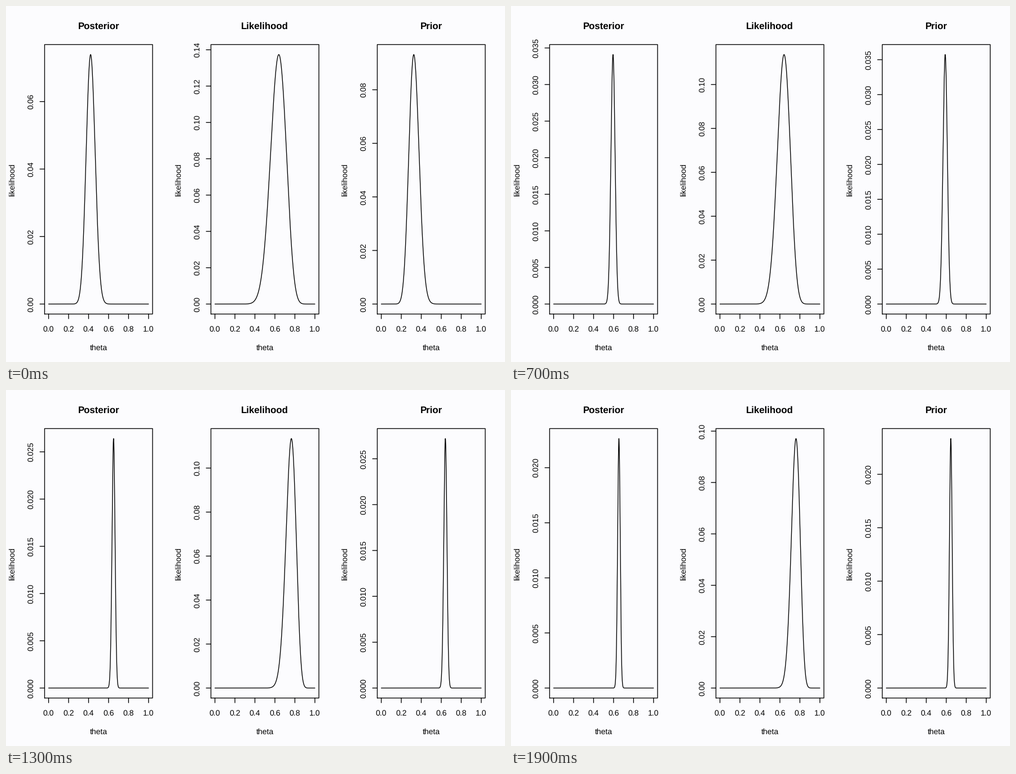
Animation, 885 px wide and 632 px high, one loop 2000 ms. Source, as a matplotlib script:

```python
import math
import numpy as np
import matplotlib as mpl
import matplotlib.pyplot as plt
from matplotlib.animation import FuncAnimation

W, H, DPI = 885, 632, 100
PT = 72 / DPI
INK, PAPER = "black", "#fcfcfe"

mpl.rcParams["font.family"] = "Liberation Sans"
mpl.rcParams["text.hinting"] = "none"

# (trials, successes): the starting prior, then one experiment per step
START = (83, 27)
TRIALS = [(36, 23), (53, 32), (78, 52), (58, 37), (42, 27),
          (94, 60), (70, 45), (53, 34), (66, 46), (81, 57),
          (73, 51), (90, 63), (57, 45), (68, 52), (57, 38),
          (74, 48), (32, 19), (28, 17), (83, 51), (92, 70)]
TOTALS = np.cumsum([START] + TRIALS, axis=0)

LINE = 16.7                      # margin line height in pixels
PANEL = W / 3
LEFT, RIGHT = 4.1 * LINE, PANEL - 2.1 * LINE
TOP, BOTTOM = 4.1 * LINE, H - 5.1 * LINE
PAD_X = (RIGHT - LEFT) * 0.04 / 1.08
PAD_Y = (BOTTOM - TOP) * 0.04 / 1.08
BASE, PEAK = BOTTOM - PAD_Y, TOP + PAD_Y
TICK = LINE / 2
MAX_TICKS = 10

theta = np.linspace(0, 1, 1001)
safe = np.clip(theta, 1e-12, 1 - 1e-12)


def binomial(n, k):
    n, k = int(n), int(k)
    log_c = math.lgamma(n + 1) - math.lgamma(k + 1) - math.lgamma(n - k + 1)
    return np.exp(log_c + k * np.log(safe) + (n - k) * np.log(1 - safe))


def tick_unit(span):
    """Round tick distance for about five intervals."""
    cell = span / 5
    base = 10 ** math.floor(math.log10(cell))
    unit = base
    for factor, bias in ((2, 0.8), (5, 1.7), (10, 0.8)):
        if factor * base - cell >= bias * (cell - unit):
            break
        unit = factor * base
    return unit


fig = plt.figure(figsize=(W / DPI, H / DPI), dpi=DPI, facecolor=PAPER)
ax = fig.add_axes([0, 0, 1, 1])
ax.set_xlim(0, W)
ax.set_ylim(H, 0)
ax.axis("off")


def stroke(xs, ys, join="round"):
    line, = ax.plot(xs, ys, color=INK, lw=1.35 * PT, snap=False,
                    solid_capstyle="round", solid_joinstyle=join)
    return line


def label(x, y, text, size=14, turn=0, weight="normal"):
    return ax.text(x, y, text, fontsize=size * PT, color=INK, rotation=turn,
                   rotation_mode="anchor", ha="center", va="baseline",
                   fontweight=weight)


class Panel:
    def __init__(self, column, title):
        x = column * PANEL
        self.left, self.right = x + LEFT, x + RIGHT
        x0, x1 = self.left + PAD_X, self.right - PAD_X
        middle = (x0 + x1) / 2
        self.xs = x0 + theta * (x1 - x0)

        stroke([self.left, self.right, self.right, self.left, self.left],
               [BOTTOM, BOTTOM, TOP, TOP, BOTTOM])
        for i in range(6):
            tx = x0 + (x1 - x0) * i / 5
            stroke([tx, tx], [BOTTOM, BOTTOM + TICK])
            label(tx, 578, f"{i / 5:.1f}")
        label(middle, 41, title, 16.8, weight="bold")
        label(middle, 611, "theta")
        label(x + 15, (TOP + BOTTOM) / 2 + 0.7, "likelihood", turn=90)

        self.curve = stroke([], [])
        self.ticks = stroke([], [])
        self.names = [label(self.left - 1.2 * LINE, BASE, "", turn=90)
                      for _ in range(MAX_TICKS)]

    def show(self, n, k):
        values = binomial(n, k)
        top = values.max()
        scale = (BASE - PEAK) / top
        self.curve.set_data(self.xs, BASE - values * scale)

        unit = tick_unit(1.08 * top)
        digits = 2 if unit > 0.0075 else 3
        count = int(1.04 * top / unit + 1e-9) + 1
        xs, ys = [], []
        for i, name in enumerate(self.names):
            y = BASE - i * unit * scale
            name.set_visible(i < count)
            if i < count:
                name.set_text(f"{i * unit:.{digits}f}")
                name.set_y(y)
                xs += [self.left, self.left - TICK, np.nan]
                ys += [y, y, np.nan]
        self.ticks.set_data(xs, ys)


panels = [Panel(i, t) for i, t in enumerate(("Posterior", "Likelihood", "Prior"))]


def draw(step):
    for panel, data in zip(panels, (TOTALS[step + 1], TRIALS[step], TOTALS[step])):
        panel.show(*data)
    return []


anim = FuncAnimation(fig, draw, frames=len(TRIALS), interval=100,
                     init_func=lambda: draw(0), repeat=True, blit=False)
plt.show()
```
